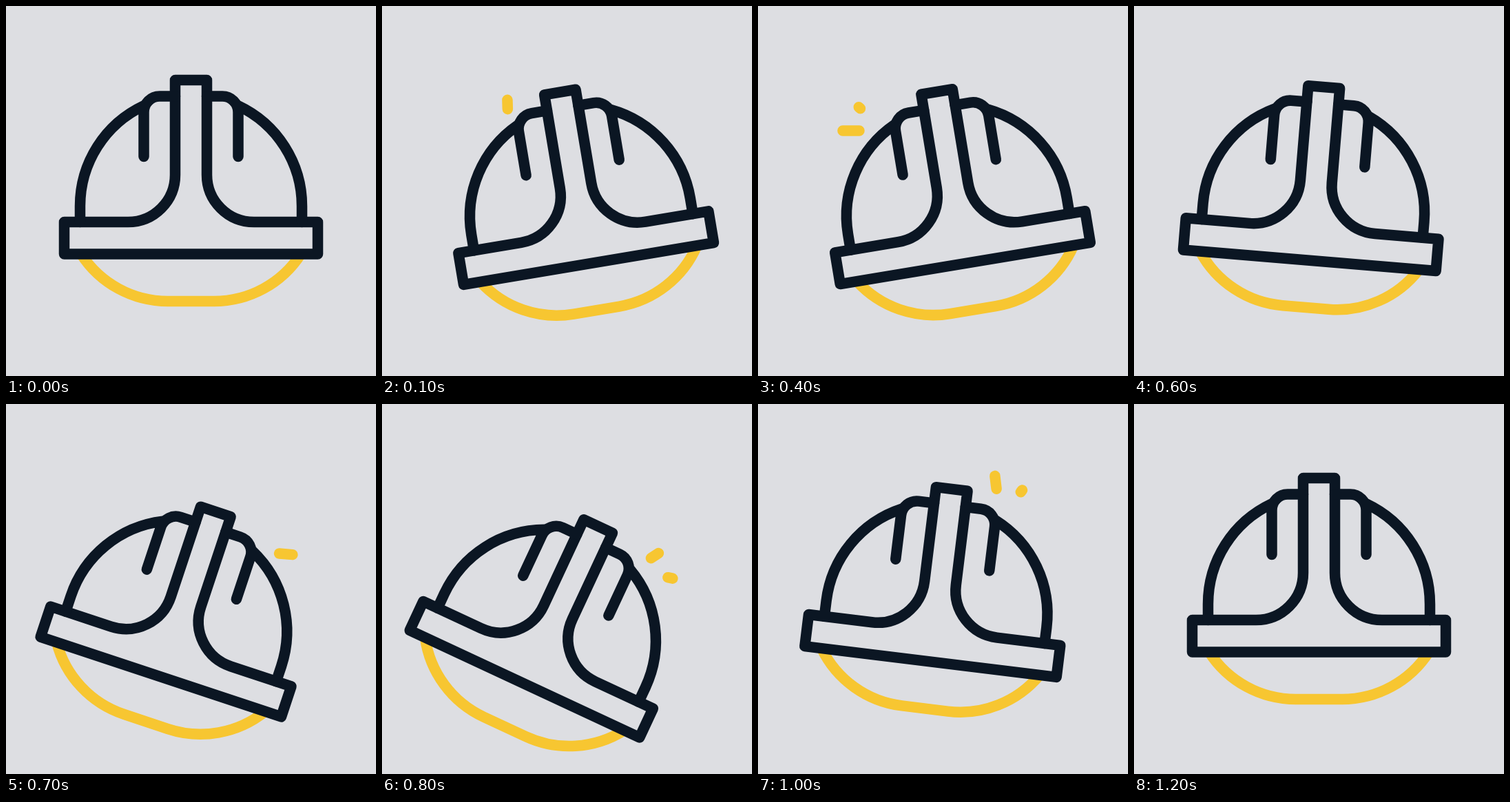
An HTML page with a canvas that plays this animation: 537x537 px, repeating every 1.4 s.

```html
<!DOCTYPE html>
<html lang="en">
<head>
<meta charset="utf-8">
<title>Safety helmet</title>
<style>
html, body { margin: 0; width: 100%; height: 100%; overflow: hidden; background: #dddee2; }
canvas { display: block; width: 100vw; height: 100vh; }
</style>
</head>
<body>
<canvas id="stage"></canvas>
<script>
const SIZE = 537, LOOP = 1400, STEP = 100;
const BG = '#dddee2', NAVY = '#0b1623', YELLOW = '#f7c631';
const canvas = document.getElementById('stage');
const ctx = canvas.getContext('2d');

// Tilt in degrees and position of the brim's base centre, one per step.
const poses = [
  [0, 268.5, 360], [-9.5, 300, 374], [-17.75, 328, 387], [-14, 315, 380],
  [-9.4, 300.8, 373.5], [-3, 279, 365], [4.76, 254.8, 369.2], [18.36, 224.8, 396],
  [25, 207, 406.3], [16.4, 226, 390.8], [7, 250.5, 374], [1.2, 265.5, 362]
];

// Each spark grows from its base, then shrinks towards its tip.
const burst = [[0, .55], [0, 1], [.87, 1]];
const sparks = [
  { base: [-79, -240.7], tip: [-75.7, -264.8], start: 1, spans: burst },
  { base: [-101.5, -230], tip: [-115.4, -249], start: 2, spans: burst },
  { base: [-120.3, -215], tip: [-144, -218.9], start: 3, spans: burst },
  { base: [106.6, -224], tip: [130, -229.6], start: 7, spans: [[0, .81], [.7, 1]] },
  { base: [89, -243], tip: [101.7, -263.4], start: 8, spans: [[0, .55], [.17, .92], [.85, 1]] },
  { base: [66.3, -252.7], tip: [59.8, -279], start: 9, spans: [[0, .81], [.3, 1], [.85, 1]] }
];

function stroke(color, cap, trace) {
  ctx.strokeStyle = color;
  ctx.lineCap = cap;
  ctx.beginPath();
  trace();
  ctx.stroke();
}

function chin() {
  const r = 150, y = -81.5, a = Math.asin(-y / r);
  ctx.arc(33.5, y, r, a, Math.PI / 2);
  ctx.arc(-33.5, y, r, Math.PI / 2, Math.PI - a);
}

function brim() {
  ctx.moveTo(-184, 0);
  ctx.lineTo(-184, -46.4);
  ctx.arcTo(-23, -46.4, -23, -252.4, 68.5);
  ctx.lineTo(-23, -252.4);
  ctx.lineTo(23, -252.4);
  ctx.arcTo(23, -46.4, 184, -46.4, 68.5);
  ctx.lineTo(184, -46.4);
  ctx.lineTo(184, 0);
  ctx.closePath();
}

function shell() {
  const r = 161;
  ctx.moveTo(-r, -46.4);
  ctx.arc(0, -69.5, r, Math.PI, Math.PI + Math.acos(68.5 / r));
  ctx.moveTo(-68.5, -141.5);
  ctx.arcTo(-68.5, -229, -23, -229, 23);
  ctx.lineTo(-23, -229);
}

function spark({ base, tip, start, spans }, step) {
  const span = spans[step - start];
  if (!span) return;
  const at = k => base.map((v, i) => v + (tip[i] - v) * k);
  stroke(YELLOW, 'round', () => {
    ctx.moveTo(...at(span[0]));
    ctx.lineTo(...at(span[1]));
  });
}

function draw(now) {
  const dpr = window.devicePixelRatio || 1;
  const w = Math.round(innerWidth * dpr), h = Math.round(innerHeight * dpr);
  if (canvas.width !== w || canvas.height !== h) {
    canvas.width = w;
    canvas.height = h;
  }
  ctx.setTransform(w / SIZE, 0, 0, h / SIZE, 0, 0);
  ctx.fillStyle = BG;
  ctx.fillRect(0, 0, SIZE, SIZE);

  const step = Math.floor((now % LOOP) / STEP);
  const [angle, x, y] = poses[step] || poses[0];
  ctx.translate(x, y);
  ctx.rotate(angle * Math.PI / 180);
  ctx.lineWidth = 15.5;
  ctx.lineJoin = 'round';

  stroke(YELLOW, 'butt', chin);
  stroke(NAVY, 'round', brim);
  for (const side of [1, -1]) {
    ctx.save();
    ctx.scale(side, 1);
    stroke(NAVY, 'round', shell);
    ctx.restore();
  }
  sparks.forEach(s => spark(s, step));
}

const begin = performance.now();
function tick() {
  draw(performance.now() - begin);
  requestAnimationFrame(tick);
}
tick();
</script>
</body>
</html>
```
